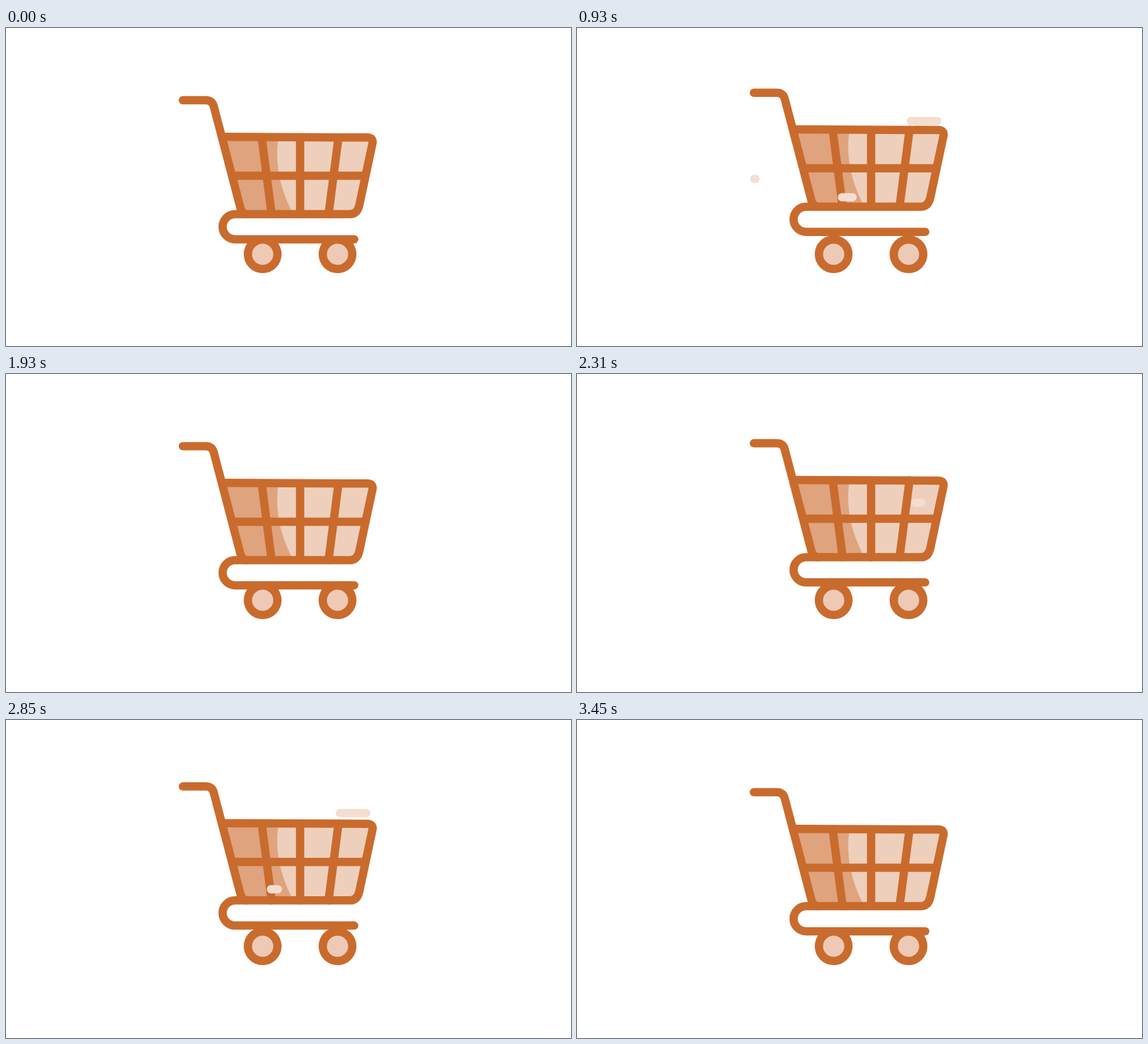
An HTML page for the animation above (3.78 s loop, 853 px wide and 480 px high).

```html
<!DOCTYPE html>
<html lang="en">
<head>
<meta charset="utf-8">
<title>Shopping cart</title>
<style>
  html, body { margin: 0; width: 100%; height: 100%; overflow: hidden; background: #fff; }
  svg { display: block; width: 100vw; height: 100vh; }
  .line { fill: none; stroke: #c96b2d; stroke-width: 12.5; stroke-linecap: round; stroke-linejoin: round; }
  .wheel { fill: #edc9b6; stroke: #c96b2d; stroke-width: 12.5; }
  .streak { stroke: #f3ded0; stroke-width: 12.5; stroke-linecap: round; }
</style>
</head>
<body>
<svg viewBox="0 0 853 480">
  <g id="cart">
    <path fill="#edcfbb" d="M327 164L553 166L532 281H356Z"/>
    <path fill="#dfa37e" d="M327 164L411.5 165C405 203 414 245 434 281H356Z"/>
    <g class="line">
      <path d="M267 109H301.5Q311 109 313.6 118L353 268Q355.5 280 363 281"/>
      <path d="M327 164.3L546 165.3Q555 166 553.3 174L533.5 267Q530.5 281 519 281H346A19 19 0 0 0 346 319H525.7"/>
      <path d="M342 223H542M386 165L401 281M444 165V281M502 165L487 281"/>
    </g>
  </g>
  <circle class="wheel" cx="387.5" cy="341.5" r="22.3"/>
  <circle class="wheel" cx="500.5" cy="341.5" r="22.3"/>
  <g id="streaks"></g>
</svg>
<script>
const LOOP = 3780, RUN = 1890, STEP = 60;
const HOP = { start: 17, length: 363, count: 3, height: 12.6 };

// Each streak grows leftward, then its right end catches up.
const streaks = [
  { y: 194.5, right: 520,   left: 405,   head: [60, 240],  tail: [240, 418] },
  { y: 227.8, right: 389.5, left: 267.5, head: [121, 360], tail: [270, 627] },
  { y: 255.5, right: 448,   left: 400,   head: [224, 499], tail: [390, 733] },
  { y: 140.5, right: 544,   left: 504,   head: [420, 600], tail: [640, 860] }
];

const cart = document.getElementById('cart');
const layer = document.getElementById('streaks');

for (const s of streaks) {
  s.el = document.createElementNS('http://www.w3.org/2000/svg', 'line');
  s.el.setAttribute('class', 'streak');
  s.el.setAttribute('y1', s.y);
  s.el.setAttribute('y2', s.y);
  layer.append(s.el);
}

function ease(t, [from, to]) {
  const p = Math.min(1, Math.max(0, (t - from) / (to - from)));
  return p * p * (3 - 2 * p);
}

function lift(t) {
  const phase = (t - HOP.start) / HOP.length;
  if (phase <= 0 || phase >= HOP.count) return 0;
  return HOP.height * Math.sin(Math.PI * phase) ** 2;
}

function draw(now) {
  const time = now % LOOP;
  const held = Math.floor((time - 30) / STEP) * STEP + 30;
  const t = (held + LOOP - 330) % RUN;

  cart.setAttribute('transform', `translate(0 ${-lift(t)})`);
  for (const s of streaks) {
    const shown = t > s.head[0] && t < s.tail[1];
    const span = s.right - s.left;
    s.el.setAttribute('visibility', shown ? 'visible' : 'hidden');
    s.el.setAttribute('x1', s.right - span * ease(t, s.head));
    s.el.setAttribute('x2', s.right - span * ease(t, s.tail));
  }
}

const begin = performance.now();
function tick() {
  draw(performance.now() - begin);
  requestAnimationFrame(tick);
}
tick();
</script>
</body>
</html>
```
